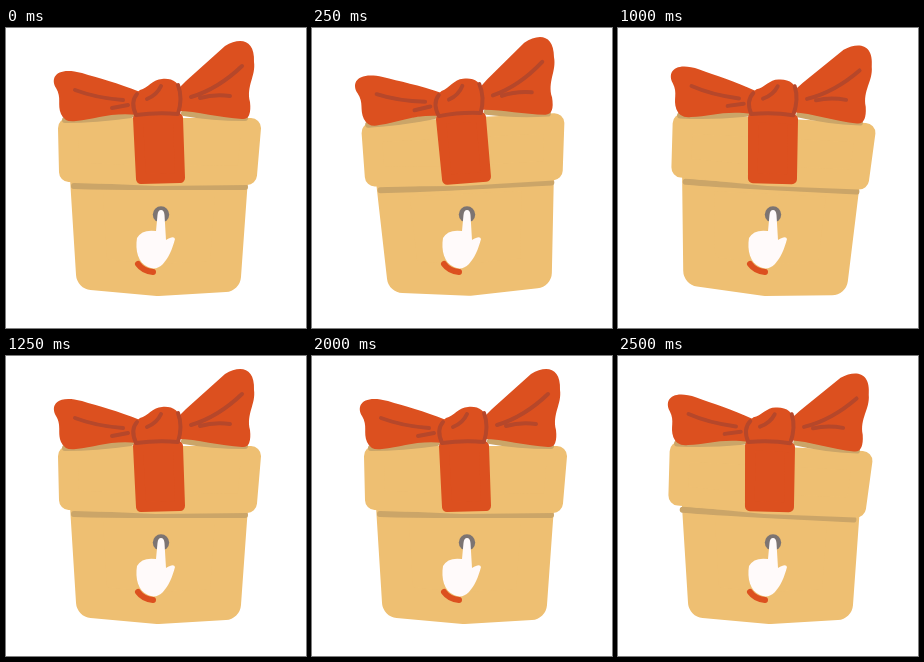
These frames come from a looping animation (300x300 px, 2.75 s). An HTML page:

```html
<!DOCTYPE html>
<html lang="en">
<head>
<meta charset="utf-8">
<title>Gift box</title>
<style>
  html, body { margin: 0; width: 100%; height: 100%; overflow: hidden; background: #fff; }
  svg { display: block; width: 100vw; height: 100vh; }
  path, polygon { stroke-linecap: round; stroke-linejoin: round; }
  #body, #lid { transform-origin: 150px 150px; }
  #hand { transform-origin: 155px 183px; }
  .card { fill: #eebf72; stroke: #eebf72; }
  .ribbon { fill: #dc501f; }
  .band { fill: #dc501f; stroke: #dc501f; stroke-width: 10; }
  .shade { fill: none; stroke: #cba568; stroke-width: 6; }
  .fold { fill: none; stroke: #b6472a; stroke-width: 4; }
  .cuff { fill: none; stroke: #dc501f; stroke-width: 6; }
  .skin { fill: #fffafa; }
  #dot { fill: #7c7472; }
  #dot.pressed { fill: #bf9f6c; }
</style>
</head>
<body>
<svg viewBox="0 0 300 300">
  <!-- Thick round-joined strokes give the card its soft corners -->
  <polygon id="body" class="card" stroke-width="32" points="80,150 226,150 219,248 152,252 86,246"/>
  <g id="lid">
    <path class="shade" d="M68,158Q95,159 150,159T239,159"/>
    <polygon class="card" stroke-width="20" points="62,100 245,100 241,147 150,148 63,144"/>
    <path class="shade" d="M59,92Q90,92 125,87M178,85Q205,90 239,90"/>
    <polygon class="band" points="132,90 172,90 174,150 135,151"/>
    <path class="ribbon" d="M134,64C112,55 92,50 76,45C50,38 44,50 50,60C56,70 51,76 55,86Q59,95 70,93C90,91 105,84 132,87Z"/>
    <path class="ribbon" d="M172,61L180,53L219,18C234,9 249,11 248,34C250,48 240,58 244,74Q246,92 236,91C215,90 190,83 172,83Z"/>
    <path class="ribbon" d="M129,87C127,75 128,66 134,62C142,60 147,51 156,51C166,50 174,54 175,66Q175,77 172,86Z"/>
    <path class="fold" d="M69,62Q90,70 117,72M106,80L122,77M131,66Q124,74 130,87Q152,84 172,86Q177,70 172,57M141,71Q151,67 155,58M185,69Q212,61 236,38M194,70Q208,66 224,68"/>
  </g>
  <circle id="dot" cx="155" cy="186.5" r="8.2"/>
  <g id="hand">
    <path class="skin" d="M151.500,187Q152,182 155,182T158.500,187L160,212Q168,207 169,211C166,222 163,229 157,236Q150,243 142,239C132,235 129,222 131,210Q136,201 150,203Z"/>
    <path class="cuff" d="M132,236Q137,243 147,244"/>
  </g>
</svg>
<script>
const LOOP = 2750, BEAT = 750, WAIT = 250, HOLD = 250;
const TILT = 2.9, SHIFT = 3;
const [body, lid, hand, dot] = ['body', 'lid', 'hand', 'dot'].map(id => document.getElementById(id));

// Each beat the box jolts to alternate sides: first as a whole, then only the lid
function render(now) {
  const t = now % LOOP;
  const beat = Math.floor(t / BEAT);
  const phase = t % BEAT;
  const jolt = phase >= WAIT && phase < WAIT + HOLD;
  const side = jolt ? (beat % 2 ? 1 : -1) : 0;
  const lidOnly = beat >= 2;
  const pressed = jolt && beat === 2;

  body.style.transform = `rotate(${lidOnly ? 0 : side * TILT}deg)`;
  lid.style.transform = `translateX(${lidOnly ? -side * SHIFT : 0}px) rotate(${side * TILT}deg)`;
  hand.style.transform = `rotate(${pressed ? 12 : 0}deg)`;
  dot.classList.toggle('pressed', pressed);
}

const start = performance.now();
function tick() {
  render(performance.now() - start);
  requestAnimationFrame(tick);
}
tick();
</script>
</body>
</html>
```
